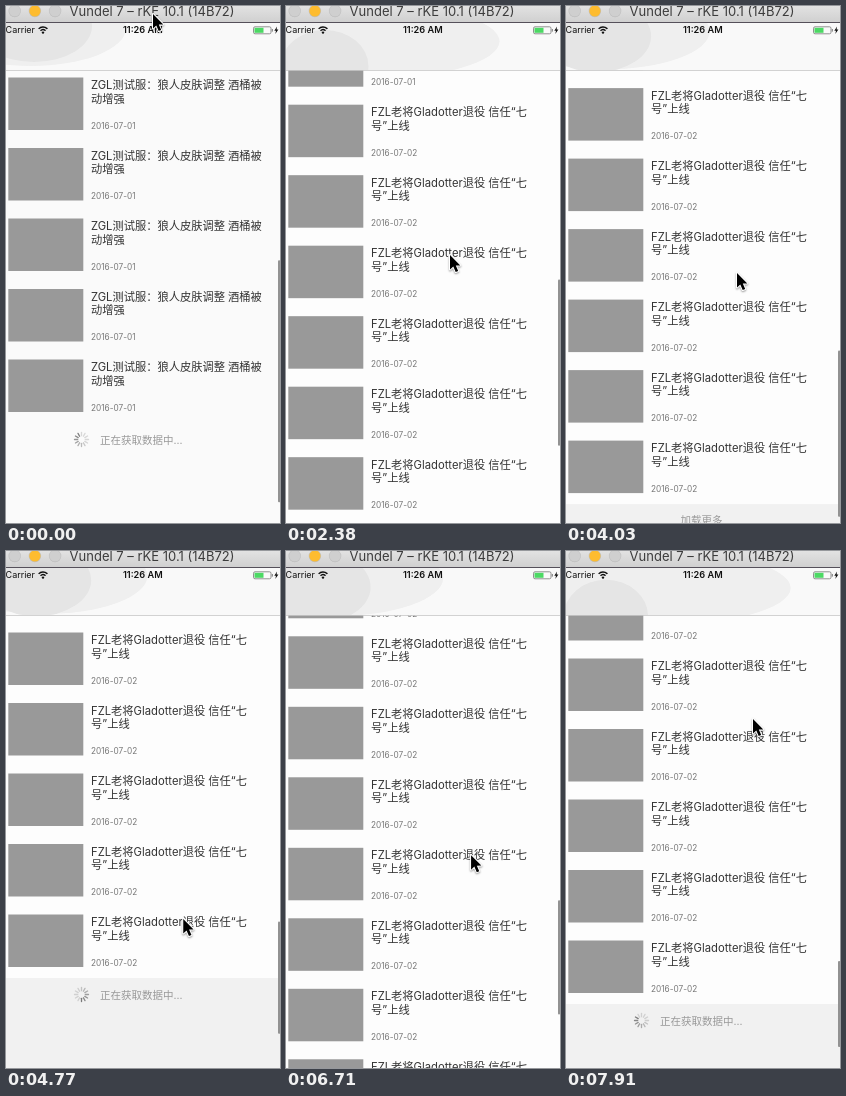
Write an HTML page with a canvas that moves like this. It is 274 px wide and 517 px high and loops after 8000 ms.

```html
<!DOCTYPE html>
<html lang="zh-CN">
<head>
<meta charset="utf-8">
<style>
html, body { margin: 0; width: 100%; height: 100%; overflow: hidden; background: #fdfdfd; }
canvas { display: block; width: 274px; height: 517px; }
</style>
</head>
<body>
<canvas id="stage"></canvas>
<script>
const W = 274, H = 517, LOOP = 8000, STEP = 150;
const NAV = 64, VIEW = H - NAV, ROW = 70.5, FOOTER = 36, FIRST_PAGE = 9, PAGE = 8;
const FONT = 'Inter, "Noto Sans CJK SC", "Noto Sans CJK", sans-serif';

const canvas = document.getElementById('stage');
const ratio = window.devicePixelRatio || 1;
canvas.width = W * ratio;
canvas.height = H * ratio;
const c = canvas.getContext('2d');
c.scale(ratio, ratio);

const news = [
  { title: ['ZGL测试服：狼人皮肤调整 酒桶被', '动增强'], date: '2016-07-01' },
  { title: ['FZL老将Gladotter退役 信任“七', '号”上线'], date: '2016-07-02' }
];

const contentHeight = rows => rows * ROW + FOOTER;
const limit = rows => contentHeight(rows) - VIEW;
const rowsAt = t => FIRST_PAGE + PAGE * ((t >= 590) + (t >= 4920));

// Each gesture eases out to its goal: { from, to, goal }
const gesture = (from, to, ...goal) => ({ from, to, goal });
const swipes = [
  gesture(140, 560, limit(9)),
  gesture(1030, 1630, 440),
  gesture(1780, 3760, 764.4),
  gesture(4030, 4480, limit(17) + 54),
  gesture(4630, 4920, limit(17)),
  gesture(5070, 5970, 995),
  gesture(6120, 7160, 1274),
  gesture(7310, 7760, limit(25) + 28)
];
const pointerMoves = [
  gesture(140, 880, 165, 451),
  gesture(1030, 2380, 164, 249),
  gesture(2830, 4030, 171, 267),
  gesture(4030, 4920, 178, 380),
  gesture(5070, 5820, 182, 187),
  gesture(6120, 7310, 187, 378),
  gesture(7310, 7760, 187, 168)
];

function glide(start, gestures, t) {
  return gestures.filter(g => g.from < t).reduce((now, g) => {
    const left = 1 - Math.min(1, (t - g.from) / (g.to - g.from));
    return now.map((v, i) => g.goal[i] + (v - g.goal[i]) * left * left);
  }, start);
}

const scrollAt = t => glide([limit(FIRST_PAGE) + 64], swipes, t)[0];
const pointerAt = t => glide([147, 8], pointerMoves, t);

function stepTime(t) {
  const anchor = [-10, 880, 4920, 7310].filter(a => a <= t).pop();
  return Math.max(0, anchor + STEP * Math.floor((t - anchor) / STEP));
}

function rect(color, x, y, w, h) {
  c.fillStyle = color;
  c.fillRect(x, y, w, h);
}

function ellipse(color, x, y, rx, ry = rx) {
  c.fillStyle = color;
  c.beginPath();
  c.ellipse(x, y, rx, ry, 0, 0, Math.PI * 2);
  c.fill();
}

function text(str, x, y, size, color, align = 'left', weight = 400) {
  c.font = `${weight} ${size}px ${FONT}`;
  c.textAlign = align;
  c.fillStyle = color;
  c.fillText(str, x, y);
}

function tracePolygon(points) {
  c.beginPath();
  points.forEach(([x, y]) => c.lineTo(x, y));
  c.closePath();
}

function drawSpinner(x, y, t) {
  const lead = Math.floor(t / 83);
  c.lineWidth = 1.3;
  c.lineCap = 'round';
  for (let i = 0; i < 12; i++) {
    const a = i * Math.PI / 6, age = (lead + 20 - i) % 12;
    c.strokeStyle = `rgba(110,110,110,${Math.max(0.25, 0.9 - age * 0.09)})`;
    c.beginPath();
    c.moveTo(x + Math.cos(a) * 3.8, y + Math.sin(a) * 3.8);
    c.lineTo(x + Math.cos(a) * 7, y + Math.sin(a) * 7);
    c.stroke();
  }
}

function drawRow(item, y) {
  rect('#999', 2.3, y, 75, 52.5);
  item.title.forEach((line, n) => text(line, 85, y + 11.6 + n * 13.5, 11.25, '#333'));
  text(item.date, 85, y + 51, 8.25, '#777');
}

function drawList(t, offset, rows, loading) {
  const top = NAV - offset, end = top + rows * ROW;
  const washed = t < 140;
  rect(washed ? '#fafafa' : '#fdfdfd', 0, NAV, W, VIEW);
  if (!washed) rect('#f1f1f1', 0, end, W, Math.max(0, H - end));

  for (let i = Math.floor(offset / ROW); i < rows && top + i * ROW < H; i++) {
    drawRow(news[i < FIRST_PAGE ? 0 : 1], top + i * ROW + 7);
  }
  if (loading) {
    drawSpinner(75.5, end + 16.5, t);
    text('正在获取数据中...', 94, end + 20.5, 10.5, '#999');
  } else {
    text('加载更多', 135.5, end + 19.5, 10.5, '#999', 'center');
  }
}

function drawScrollbar(t, offset, rows) {
  const content = contentHeight(rows);
  const length = VIEW * VIEW / content - Math.max(0, offset - limit(rows));
  const lagging = NAV + scrollAt(t - STEP) * VIEW / content;
  c.fillStyle = '#929292';
  c.beginPath();
  c.roundRect(272, Math.min(lagging, 514 - length), 2.2, length, 1);
  c.fill();
}

function drawStatus() {
  text('Carrier', 29, 27.3, 9, '#111', 'right');
  text('11:26 AM', 136.8, 27.3, 9.2, '#111', 'center', 600);

  c.strokeStyle = '#111';
  c.lineCap = 'butt';
  c.lineWidth = 1.4;
  for (const r of [3.4, 6]) {
    c.beginPath();
    c.arc(37, 27, r, -Math.PI * 0.76, -Math.PI * 0.24);
    c.stroke();
  }
  ellipse('#111', 37, 26.6, 1.2);

  c.lineWidth = 0.8;
  c.strokeStyle = '#777';
  c.beginPath();
  c.roundRect(247.5, 20.8, 17.5, 7, 1.5);
  c.stroke();
  rect('#4cd964', 248.5, 21.8, 9, 5);
  rect('#777', 265.8, 23, 1, 2.6);
  tracePolygon([[271, 20.5], [268.3, 24.8], [270, 24.8], [269.3, 28], [272.4, 23.5], [270.6, 23.5]]);
  c.fillStyle = '#111';
  c.fill();
}

// The blurred thumbnail behind the bar sinks and narrows between rows.
function drawNav(offset) {
  const sink = (1 - Math.cos(offset / ROW * Math.PI * 2)) / 2;
  c.save();
  c.beginPath();
  c.rect(0, 17, W, NAV - 17);
  c.clip();
  rect('#f9f9f9', 0, 17, W, NAV - 17);
  ellipse('#efefef', 25 + 60 * sink, 22 + 15 * sink, 95 + 45 * sink, 38);
  ellipse('#e5e5e5', 28 + 12 * sink, 20 + 45 * sink, 58 - 16 * sink, 36);
  c.restore();
  rect('#c8c8c8', 0, 64, W, 0.8);
  drawStatus();
}

function drawWindowBar() {
  const shade = c.createLinearGradient(0, 0, 0, 16);
  shade.addColorStop(0, '#e2e2e2');
  shade.addColorStop(1, '#d0d0d0');
  rect(shade, 0, 0, W, 16);
  rect('#55505a', 0, 16, W, 1);
  ['#cfcfcf', '#fdbc2f', '#cfcfcf'].forEach((fill, i) => {
    const x = 8.7 + i * 20.2;
    ellipse('rgba(0,0,0,0.12)', x, 5, 6.2);
    ellipse(fill, x, 5, 5.6);
  });
  text('Vundel 7 – rKE 10.1 (14B72)', 146, 10, 13, '#3c3c3c', 'center');
}

function drawPointer([x, y]) {
  c.save();
  c.translate(x, y);
  tracePolygon([[0, 0], [0, 14.5], [3.3, 11.4], [5.7, 17], [8.2, 16], [5.8, 10.6], [10.3, 10.4]]);
  c.lineJoin = 'round';
  c.lineWidth = 2;
  c.strokeStyle = '#fff';
  c.shadowColor = 'rgba(0,0,0,0.4)';
  c.shadowBlur = 2 * ratio;
  c.shadowOffsetY = ratio;
  c.stroke();
  c.shadowColor = 'transparent';
  c.fillStyle = '#000';
  c.fill();
  c.restore();
}

function render(time) {
  const t = stepTime(time);
  const offset = scrollAt(t), rows = rowsAt(t);
  const loading = offset > limit(rows) + 0.01;
  const moving = Math.abs(offset - scrollAt(t - 2 * STEP)) > 0.01;
  drawList(t, offset, rows, loading);
  if (loading || moving) drawScrollbar(t, offset, rows);
  drawNav(offset);
  drawWindowBar();
  drawPointer(pointerAt(t));
}

const begin = performance.now();
function tick() {
  render((performance.now() - begin) % LOOP);
  requestAnimationFrame(tick);
}
tick();
</script>
</body>
</html>
```
